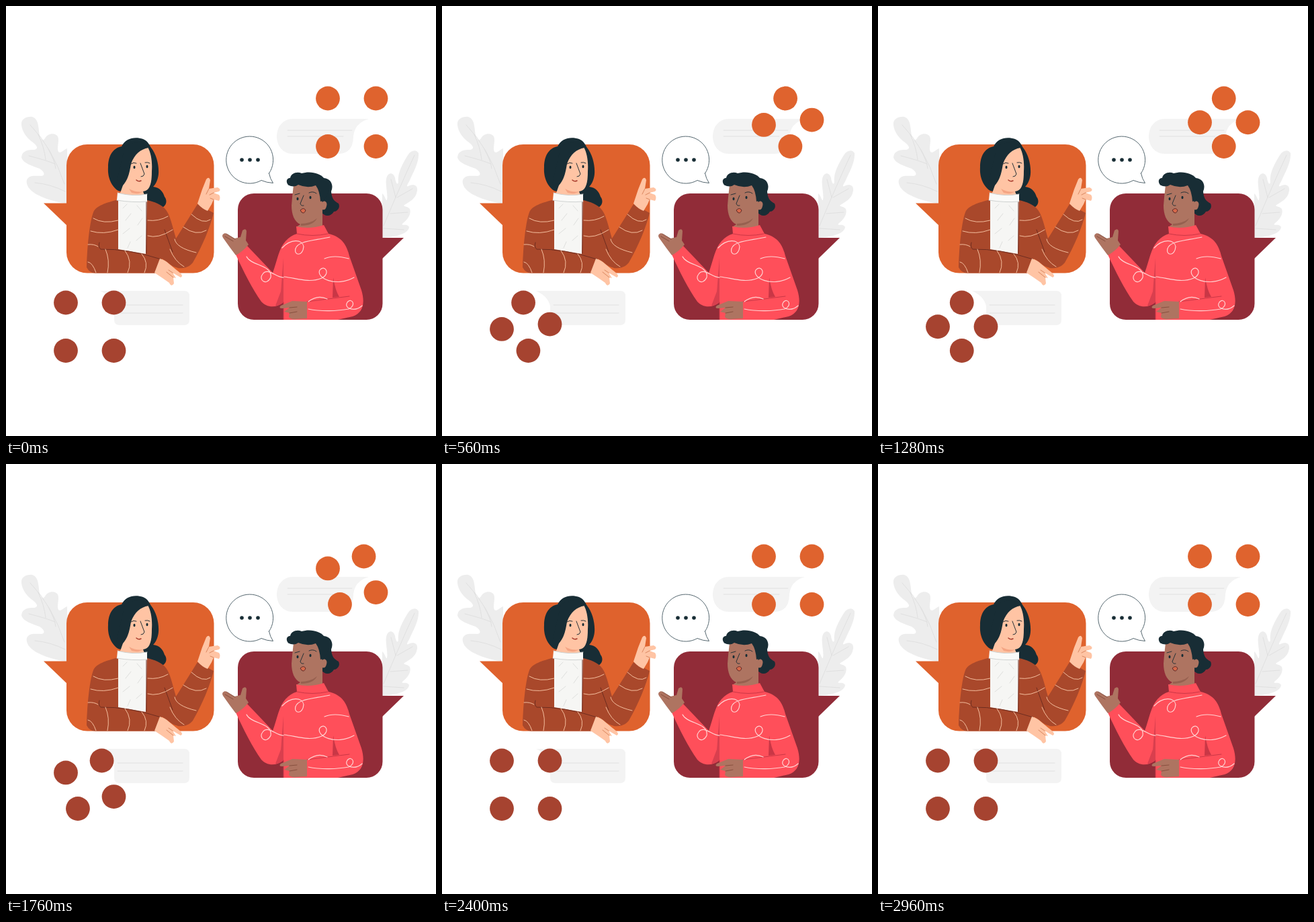
An HTML page that plays this animation: 640x640 px, repeating every 3040 ms.

```html
<!DOCTYPE html>
<html lang="en">
<head>
<meta charset="utf-8">
<title>Conversation</title>
<style>
  html, body { margin: 0; width: 100%; height: 100%; overflow: hidden; background: #fff; }
  svg { display: block; width: 100%; height: 100%; }
  .line { fill: none; stroke-width: 1; stroke-linecap: round; stroke-linejoin: round; }
  .hair { fill: #182d35; }
  .ink { stroke: #263238; }
  .vein { stroke: #e0e0e0; }
  .light { fill: #f3f3f3; }
  .leaf { fill: #ededed; }
  .orange { fill: #df622d; }
  .wine { fill: #912c38; }
  .pale { fill: #ffc4a4; }
  .tan { fill: #ae7461; }
  .knit { fill: #a9482b; }
  .pink { fill: #ff4f5a; }
  .stitch { stroke: #f3bd9d; }
  .swirl { stroke: #ffd3d2; stroke-width: 1.2; }
</style>
</head>
<body>
<svg viewBox="0 0 640 640" xmlns="http://www.w3.org/2000/svg">
  <defs>
    <clipPath id="leftPanel"><path d="M0 0H640V300H309.500V365Q309.500 397.500 278 397.500H122Q90 397.500 90 365V200H0Z"/></clipPath>
    <clipPath id="rightPanel"><path d="M300 200H560V443Q560 467 536 467H369Q345 467 345 443V400H300Z"/></clipPath>
  </defs>

  <g id="leaves">
    <path class="leaf" d="M23 177C22 168 31 164 39 165C49 168 48 181 50 192C51 199 55 202 58 197C62 189 73 188 77 194C80 201 75 211 78 217C81 220 86 214 91 212V294C76 292 61 288 49 282C36 276 29 267 31 259C34 251 45 253 53 253C59 252 57 246 50 242C39 238 25 234 23 225C24 215 33 214 42 214C49 213 46 207 40 203C31 197 24 187 23 177Z"/>
    <path class="line vein" d="M36 177Q69 211 87 265M48 191Q57 210 59 229M63 213Q73 231 74 242M34 223Q58 229 73 235M43 263Q66 265 88 276"/>
    <path class="leaf" d="M560 279C564 282 565 290 567 289C569 279 563 263 567 254C570 247 577 248 579 256C580 262 582 267 584 263C582 248 591 234 598 222C603 214 611 213 614 219C615 232 607 246 602 257C599 264 594 270 599 268C607 264 613 267 612 275C610 287 601 291 593 296C590 299 597 297 601 302C604 311 596 319 590 324C588 328 597 323 600 329C599 340 576 344 560 345Z"/>
    <path class="line vein" d="M608 222Q587 267 562 327M573 258L580 285M605 272L582 285M598 307L572 309M592 333L562 331"/>
  </g>

  <g id="messages">
    <path class="light" d="M427 168H540Q519 174 517 194Q517 220 494 220H427C395 220 395 168 427 168Z"/>
    <path class="line vein" d="M419 185H515M419 194H502"/>
    <path class="light" d="M140 424H266Q273 424 273 432V467Q273 475 265 475H169Q161 475 161 467V447Q158 432 140 424Z"/>
    <path class="line vein" d="M166 445H263M166 457H263"/>
  </g>

  <g id="panels">
    <rect class="orange" x="90" y="206" width="219.500" height="191.500" rx="31"/>
    <path class="orange" d="M56 293.500H92V328Z"/>
    <rect class="wine" x="345" y="279" width="215.500" height="188" rx="24"/>
    <path class="wine" d="M558 345H592L558 378Z"/>
  </g>

  <g id="woman">
    <path class="hair" d="M152 240C152 222 160 211 172 209C178 197 191 194 204 198C211 201 213 206 216 211C224 221 228 237 227 250C226 260 222 266 219 269C229 270 234 277 236 284C241 290 238 299 231 300C221 300 211 294 206 286L167 275C156 268 151 254 152 240Z"/>
    <path class="pale" d="M186 234C188 222 197 212 211 210C216 219 218 232 217 246C217 262 215 275 204 276L207 284H168L175 264C182 255 182 244 186 234Z"/>
    <path fill="#f4a584" d="M183 272Q194 278 204 276Q198 281 187 278Z"/>
    <path class="hair" d="M177 209C191 200 208 202 212 211C200 213 191 221 186 235C184 247 182 259 173 268L164 265Z"/>
    <g class="line ink">
      <path d="M200 234L206 250Q205 254 201 254M186 235Q190 232 194 234M207 233Q211 232 214 234"/>
      <path d="M194 259Q197 262 201 260" stroke="#a83b2d" stroke-width="1.500"/>
    </g>
    <ellipse cx="191" cy="240" rx="1.500" ry="2.200" class="hair"/>
    <ellipse cx="210" cy="239" rx="1.500" ry="2.200" class="hair"/>
    <g clip-path="url(#leftPanel)">
      <path class="knit" d="M167 288C149 293 134 297 130 307C125 320 121 353 120 389Q124 397 133 398H228L232 376L241 382C254 394 270 392 278 382C292 358 304 329 309 308L285 295L253 346C247 326 244 309 236 301C228 293 216 290 205 288Z"/>
      <path fill="#f6f6f4" d="M167 283H210L208 369L167 362Z"/>
      <path class="line" stroke="#dedfdd" d="M174 301L180 295M195 297L202 305M178 319L186 309M196 326L203 316M174 339L184 331M194 349L202 342M181 360L185 351"/>
      <path class="line" stroke="#6e2d20" d="M139 352Q137 359 141 362Q181 361 231 377M209 290V368M236 333L248 366"/>
      <path class="line stitch" d="M130 316Q145 325 167 319M126 335Q145 341 167 333M122 355Q131 354 137 358M211 319Q227 321 241 313M211 342Q226 347 248 333M276 310Q293 326 304 318M264 329Q283 343 298 334M251 347Q253 360 283 367M244 362Q251 380 265 388M148 362Q155 378 151 397M177 364Q189 380 181 397M202 369Q213 382 206 397M122 381Q129 382 134 397"/>
    </g>
    <path fill="#fafaf8" d="M166 278Q188 284 210 280L210 291Q188 293 165 289Z"/>
    <path class="line" stroke="#cfd2d1" d="M166 278Q188 284 210 280M165 289Q188 293 210 291"/>
    <path class="pale" d="M285 294L292 273L298 258Q302 253 304 259L302 272L315 270Q321 273 317 276L309 278L317 281Q320 285 317 290L309 288L306 295L300 305Q292 302 285 294Z"/>
    <path class="line" stroke="#d9865f" d="M302 272L298 280M309 278L303 281M309 288L304 286"/>
    <path class="pale" d="M229 376Q237 378 243 384L260 398Q264 402 260 404L248 397L253 405L249 404L250 413Q246 419 243 412L233 405L221 397Z"/>
    <path class="line" stroke="#d9865f" d="M248 397L242 393M249 404L239 396"/>
  </g>

  <g id="man">
    <path class="hair" d="M421 267C416 263 417 256 423 256C424 249 433 246 440 249C453 245 468 249 473 256C484 257 488 267 484 276C485 287 488 290 495 294C498 300 493 306 488 306C483 314 474 314 469 306L460 273Z"/>
    <path class="tan" d="M429 260H464C467 274 467 285 471 292C475 288 479 293 477 298C476 303 473 304 471 303V329Q452 336 432 329L438 325C429 321 425 310 425 297C426 284 427 273 429 260Z"/>
    <path fill="#96604f" d="M439 324Q453 324 463 316Q457 327 439 327Z"/>
    <path class="hair" d="M420 266Q428 271 435 266Q449 272 461 267Q467 275 468 291L474 289L483 269L465 253L431 252Z"/>
    <path class="line ink" d="M443 282L438 294Q439 298 443 297M430 281L437 279M451 278Q457 275 462 279"/>
    <ellipse cx="434" cy="287" rx="1.500" ry="2.200" class="hair"/>
    <ellipse cx="453" cy="285" rx="1.500" ry="2.200" class="hair"/>
    <path d="M438 304Q443 299 446 304Q444 310 440 307Z" fill="#d6694b" stroke="#5c2a29"/>
    <g clip-path="url(#rightPanel)">
      <path class="pink" d="M432 328Q452 333 473 326L480 339C499 343 507 355 511 372L529 423C535 443 531 457 516 462L494 467H413L413 441C401 451 387 448 380 440C367 422 353 394 342 370L358 356L397 397C404 378 406 361 416 350Q423 342 433 339Z"/>
      <path fill="#d93f4e" d="M413 375L409 425L401 446Q407 446 413 441Z"/>
      <path fill="#c93746" d="M487 404Q490 423 496 433L486 434Z"/>
      <path class="line" stroke="#c93746" d="M433 339Q456 344 479 339M413 441V467M448 440L511 432"/>
      <path class="line swirl" d="M411 360C424 346 441 347 443 358C442 373 428 372 431 361C435 350 453 350 482 344M358 373C365 387 397 385 394 404C388 417 375 408 382 399C389 388 403 405 413 404M414 403C432 405 451 413 470 405C484 398 474 384 467 393C461 405 491 419 518 404M474 376Q488 370 510 376M450 451C469 455 494 454 510 451C522 446 515 433 508 441C502 450 519 456 530 446M450 440Q464 429 478 436"/>
    </g>
    <path class="tan" d="M342 371L333 359L323 345Q320 340 326 338L340 346L349 344L352 334Q357 330 358 335L357 349L361 355Q353 365 342 371Z"/>
    <path class="line" stroke="#87503f" d="M326 343L338 350M328 339L341 347"/>
    <path class="tan" d="M448 440L426 439L409 446Q405 450 411 450L422 449L414 455L422 457L421 463Q425 467 432 466L448 465Z"/>
    <path class="line" stroke="#87503f" d="M422 449L433 448M422 457L433 455"/>
  </g>

  <g id="typing">
    <path class="line" fill="#fff" stroke="#55676f" d="M391.500 249A35 35 0 1 0 380 259.500Q388 263 397.500 263.500Q393 257 391.500 249Z" style="fill:#fff"/>
    <g class="hair"><circle cx="351" cy="229" r="2.800"/><circle cx="363" cy="229" r="2.800"/><circle cx="375" cy="229" r="2.800"/></g>
  </g>

  <g id="dots"></g>
</svg>
<script>
const LOOP = 3040, STAGE = LOOP / 2, TRAVEL = 824, TICK = 80;
const SIDE = 71.5, RADIUS = 17.9;
const CORNERS = [[0, 0], [1, 0], [1, 1], [0, 1]];
const layer = document.getElementById('dots');

function makeGroup(left, top, color) {
  return CORNERS.map((_, index) => {
    const node = document.createElementNS('http://www.w3.org/2000/svg', 'circle');
    node.setAttribute('r', RADIUS);
    node.setAttribute('fill', color);
    layer.append(node);
    return { node, index, left, top };
  });
}

const dots = [...makeGroup(479, 137.5, '#df632e'), ...makeGroup(89, 441.5, '#a64330')];

const easeOut = x => 1 - (1 - Math.min(x, 1)) ** 2;

// Two eased half-sides per loop, each followed by a rest.
function progress(time) {
  const stage = Math.floor(time / STAGE);
  return (stage + easeOut((time % STAGE) / TRAVEL)) / 2;
}

function render(time) {
  const p = progress(time);
  for (const { node, index, left, top } of dots) {
    const from = CORNERS[index], to = CORNERS[(index + 1) % 4];
    const at = axis => (from[axis] + (to[axis] - from[axis]) * p) * SIDE;
    node.setAttribute('cx', left + at(0));
    node.setAttribute('cy', top + at(1));
  }
}

const start = performance.now();
function frame() {
  const time = (performance.now() - start) % LOOP;
  render(Math.floor(time / TICK) * TICK);
  requestAnimationFrame(frame);
}
frame();
</script>
</body>
</html>
```
